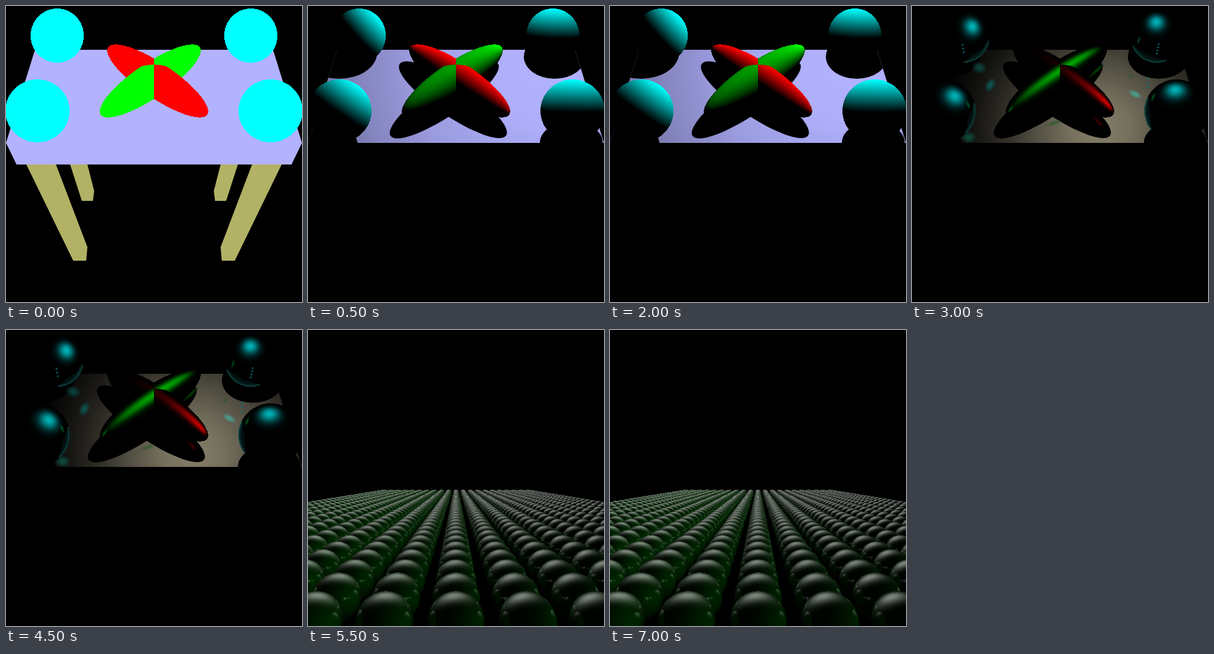
An HTML page with a canvas for the animation above (8 s loop, 480 by 480 pixels).

```html
<!DOCTYPE html>
<html>
<head>
<meta charset="utf-8">
<title>Ray-traced table and sphere field</title>
<style>
html, body { margin: 0; width: 100%; height: 100%; overflow: hidden; background: #000; }
canvas { display: block; width: 100vw; height: 100vh; }
</style>
</head>
<body>
<canvas id="stage" width="480" height="480"></canvas>
<script>
const SIZE = 480, TAU = Math.PI * 2;

function layer(w = SIZE, h = w) {
  const c = document.createElement('canvas');
  c.width = w;
  c.height = h;
  return c.getContext('2d');
}

function scene(draw) {
  const g = layer();
  g.fillStyle = '#000';
  g.fillRect(0, 0, SIZE, SIZE);
  draw(g);
  return g.canvas;
}

function tracePoly(g, pts) {
  g.beginPath();
  pts.forEach(([x, y]) => g.lineTo(x, y));
  g.closePath();
}

function clipped(g, path, draw) {
  g.save();
  path();
  g.clip();
  draw();
  g.restore();
}

function oval(g, [x, y, rx, ry, rot = 0], fill) {
  g.beginPath();
  g.ellipse(x, y, rx, ry, rot, 0, TAU);
  g.fillStyle = fill;
  g.fill();
}

// Soft elliptical spot.
function glow(g, x, y, rx, ry, rot, color) {
  g.save();
  g.translate(x, y);
  g.rotate(rot);
  g.scale(rx, ry);
  const fade = g.createRadialGradient(0, 0, 0, 0, 0, 1);
  fade.addColorStop(0, `rgba(${color},1)`);
  fade.addColorStop(0.45, `rgba(${color},.65)`);
  fade.addColorStop(1, `rgba(${color},0)`);
  g.fillStyle = fade;
  g.fillRect(-1, -1, 2, 2);
  g.restore();
}

// Ellipsoid lit per pixel; light() maps a surface normal to 0..1.
function blob(g, [cx, cy, a, b, rot = 0], color, light) {
  const R = Math.ceil(Math.max(a, b)) + 2, x0 = Math.floor(cx) - R, y0 = Math.floor(cy) - R;
  const t = layer(2 * R), img = t.createImageData(2 * R, 2 * R);
  const c = Math.cos(rot), s = Math.sin(rot), depth = Math.min(a, b);
  for (let j = 0; j < 2 * R; j++) for (let i = 0; i < 2 * R; i++) {
    const dx = x0 + i + 0.5 - cx, dy = y0 + j + 0.5 - cy;
    const u = (dx * c + dy * s) / a, v = (dy * c - dx * s) / b, q = 1 - u * u - v * v;
    if (q < 0) continue;
    const p = u / a, r = v / b, w = Math.sqrt(q) / depth, len = Math.hypot(p, r, w);
    const k = light((p * c - r * s) / len, (p * s + r * c) / len, w / len);
    const o = (j * 2 * R + i) * 4;
    for (let n = 0; n < 3; n++) img.data[o + n] = color[n] * k;
    img.data[o + 3] = 255;
  }
  t.putImageData(img, 0, 0);
  g.drawImage(t.canvas, x0, y0);
}

function shine(dir, power = 1) {
  const len = Math.hypot(...dir);
  return (x, y, z) => Math.max(0, (x * dir[0] + y * dir[1] + z * dir[2]) / len) ** power;
}
const flat = () => 1;

// Table scene
const mirror = pts => pts.map(([x, y]) => [SIZE - x, y]);
const BODY = [[47, 71], [433, 71], [480, 222], [463, 257], [17, 257], [0, 222]];
const TOP = [[47, 71], [433, 71], [480, 222], [0, 222]];
const LEGS = [
  [[33, 257], [81, 257], [132, 391], [130, 413], [109, 413]],
  [[104, 257], [132, 257], [143, 300], [141, 316], [123, 316]]
];
const BALLS = [[83, 48, 43, 44], [51, 170, 52, 51], [397, 48, 43, 44], [429, 170, 52, 51]];
const RED = [246, 121.5, 97, 27.7, 0.597], GREEN = [234, 121.5, 97, 27.7, -0.597];
const SHADOWS = [
  [50, 76, 62, 42], [20, 228, 61, 45], [400, 82, 50, 36], [427, 222, 51, 35],
  [235, 152, 104, 27, 0.592], [221, 152, 105, 27, -0.592]
];

// Two crossing ellipsoids: they swap at x = 240 and along the arc between front and back.
function star(g, red, green) {
  const lobes = [[0, red, green], [240, green, red]];
  for (const [x, back, front] of lobes) clipped(g, () => {
    g.beginPath();
    g.rect(x, 0, 240, SIZE);
  }, () => {
    back();
    clipped(g, () => {
      g.beginPath();
      g.ellipse(240, 131, 53, 36, 0, 0, TAU);
      g.rect(0, 116, SIZE, 100);
    }, front);
  });
}

function tableTop(g, center, stops, extras = () => {}) {
  clipped(g, () => tracePoly(g, TOP), () => {
    const fade = g.createRadialGradient(...center, 0, ...center, 340);
    stops.forEach(([at, color]) => fade.addColorStop(at, color));
    g.fillStyle = fade;
    g.fillRect(0, 0, SIZE, SIZE);
    SHADOWS.forEach(s => oval(g, s, '#000'));
    extras();
  });
}

function drawAmbient(g) {
  g.fillStyle = '#b2b266';
  for (const leg of LEGS) for (const pts of [leg, mirror(leg)]) {
    tracePoly(g, pts);
    g.fill();
  }
  tracePoly(g, BODY);
  g.fillStyle = '#b2b2ff';
  g.fill();
  BALLS.forEach(b => blob(g, b, [0, 255, 255], flat));
  star(g, () => blob(g, RED, [255, 0, 0], flat), () => blob(g, GREEN, [0, 255, 0], flat));
}

function drawDiffuse(g) {
  tableTop(g, [390, 90], [[0, '#b2b2ff'], [0.3, '#aeaefa'], [0.65, '#9a9ade'], [1, '#7c7cb2']]);
  const lights = [[0.72, -0.7, 0.08], [0.58, -0.81, 0.06], [0.05, -1, 0.1], [0.02, -1, 0.04]];
  BALLS.forEach((b, i) => blob(g, b, [0, 255, 255], shine(lights[i])));
  star(g,
    () => blob(g, RED, [255, 0, 0], shine([0.4, -0.88, 0.15])),
    () => blob(g, GREEN, [0, 255, 0], shine([0.42, -0.82, 0.4])));
}

function dots(g, x, y, count, dx, dy) {
  for (let i = 0; i < count; i++) glow(g, x + i * dx, y + i * dy, 2.5, 2, 0, '0,120,120');
}

// Thin reflection along the rim of a ball.
function rim(g, [x, y, rx, ry], from, to, width = 2.5) {
  for (let i = 0; i < 4; i++) {
    g.beginPath();
    g.ellipse(x, y, rx - 1 - i * width, ry - 1 - i * width, 0, from + i * 0.12, to - i * 0.12);
    g.strokeStyle = `rgba(20,110,105,${0.5 / (1 + i)})`;
    g.lineWidth = width;
    g.stroke();
  }
}

function drawSpecular(g) {
  tableTop(g, [305, 200],
    [[0, '#847e69'], [0.15, '#746f5c'], [0.3, '#545044'], [0.45, '#322f28'], [0.6, '#151411'], [0.76, '#000']],
    () => {
      glow(g, 127, 128, 8, 13, 0.5, '10,90,85');
      glow(g, 109, 100, 13, 10, 0.3, '8,70,65');
      glow(g, 92, 213, 13, 10, 0, '12,80,65');
      glow(g, 362, 143, 13, 6, 0.5, '70,165,150');
      glow(g, 230, 190, 14, 4, -0.3, '50,90,45');
      glow(g, 302, 188, 12, 4, 0.8, '60,0,0');
      glow(g, 298, 105, 20, 4, -0.7, '0,70,0');
      glow(g, 355, 114, 5, 3, -0.6, '45,85,45');
      dots(g, 383, 118, 3, -0.5, 7);
    });
  const highlights = [[0.35, -0.33, 0.88], [0.35, -0.47, 0.81], [-0.02, -0.49, 0.87], [-0.04, -0.67, 0.74]];
  BALLS.forEach((b, i) => blob(g, b, [0, 176, 181], shine(highlights[i], 20)));
  rim(g, BALLS[0], 0.2, 1.55);
  rim(g, BALLS[1], -0.25, 0.8);
  rim(g, BALLS[2], 1.2, 2.75);
  rim(g, BALLS[3], 2.5, 3.6);
  oval(g, [110, 63, 7, 8], '#000');
  dots(g, 82, 63, 3, 1, 6);
  dots(g, 400, 62, 4, -1, 5);
  glow(g, 368, 55, 3, 8, 0.3, '0,70,25');
  glow(g, 91, 160, 3, 9, -0.4, '0,80,40');
  glow(g, 391, 148, 3, 9, 0.4, '0,80,30');
  star(g,
    () => blob(g, RED, [200, 0, 0], shine([0.6, -0.25, 0.78], 20)),
    () => blob(g, GREEN, [0, 165, 0], shine([-0.14, -0.36, 0.92], 18)));
  glow(g, 160, 167, 3, 9, 0.6, '0,80,10');
}

// Field of mirror balls, radius .4, one per unit cell, two units below the eye
const FOCAL = 240 / Math.tan(Math.PI / 8), LEVEL = -2, RADIUS = 0.4;
const keyLight = [-0.12, 0.7, -0.7], fillLight = [0.8, 0.2, 0.57];
const dot = (a, b) => a[0] * b[0] + a[1] * b[1] + a[2] * b[2];
const along = (o, d, t) => [o[0] + d[0] * t, o[1] + d[1] * t, o[2] + d[2] * t];

function findBall(o, d) {
  const top = LEVEL + RADIUS, low = LEVEL - RADIUS;
  let t = o[1] > top ? (top - o[1]) / d[1] : 0, lastX, lastZ;
  if (t < 0 || !isFinite(t)) return null;
  for (; t < 62; t += 0.1) {
    const p = along(o, d, t), x = Math.round(p[0]), z = Math.round(p[2]);
    if (p[1] < low - 0.1 || p[1] > top + 0.1) return null;
    if (x === lastX && z === lastZ) continue;
    lastX = x;
    lastZ = z;
    if (Math.abs(x) > 10 || z > -5 || z < -50) continue;
    const oc = [o[0] - x, o[1] - LEVEL, o[2] - z], b = dot(oc, d);
    const q = b * b - dot(oc, oc) + RADIUS * RADIUS;
    if (q < 0) continue;
    const hit = -b - Math.sqrt(q);
    if (hit > 0.001) return { t: hit, center: [x, LEVEL, z] };
  }
  return null;
}

function trace(o, d, bounces) {
  const ball = findBall(o, d);
  if (!ball) return [0, 0, 0];
  const p = along(o, d, ball.t);
  const n = p.map((v, i) => (v - ball.center[i]) / RADIUS);
  const bounce = along(d, n, -2 * dot(d, n));
  const key = Math.max(0, dot(n, keyLight)), fill = Math.max(0, dot(n, fillLight));
  const spec = 125 * Math.max(0, dot(bounce, keyLight)) ** 5;
  const tint = Math.min(1.4, Math.max(0.4, 0.9 - 0.07 * p[0]));
  const green = 3 + tint * (12 * key + 30 * fill ** 3);
  const echo = bounces ? trace(p, bounce, bounces - 1) : [0, 0, 0];
  return [spec, spec + green, spec].map((v, i) => v + 0.4 * echo[i]);
}

function drawField(g) {
  const img = g.getImageData(0, 0, SIZE, SIZE);
  for (let y = 250; y < SIZE; y++) for (let x = 0; x < SIZE; x++) {
    const d = [x + 0.5 - 240, 239.5 - y, -FOCAL], len = Math.hypot(...d);
    img.data.set(trace([0, 0, 0], d.map(v => v / len), 1), (y * SIZE + x) * 4);
  }
  g.putImageData(img, 0, 0);
}

const scenes = [drawAmbient, drawDiffuse, drawSpecular, drawField].map(scene);
const starts = [0, 500, 3000, 5500], LOOP = 8000;
const stage = document.getElementById('stage').getContext('2d');
let origin;

function play(now) {
  origin ??= now;
  const time = (now - origin) % LOOP;
  stage.drawImage(scenes[starts.filter(s => s <= time).length - 1], 0, 0);
  requestAnimationFrame(play);
}
requestAnimationFrame(play);
</script>
</body>
</html>
```
